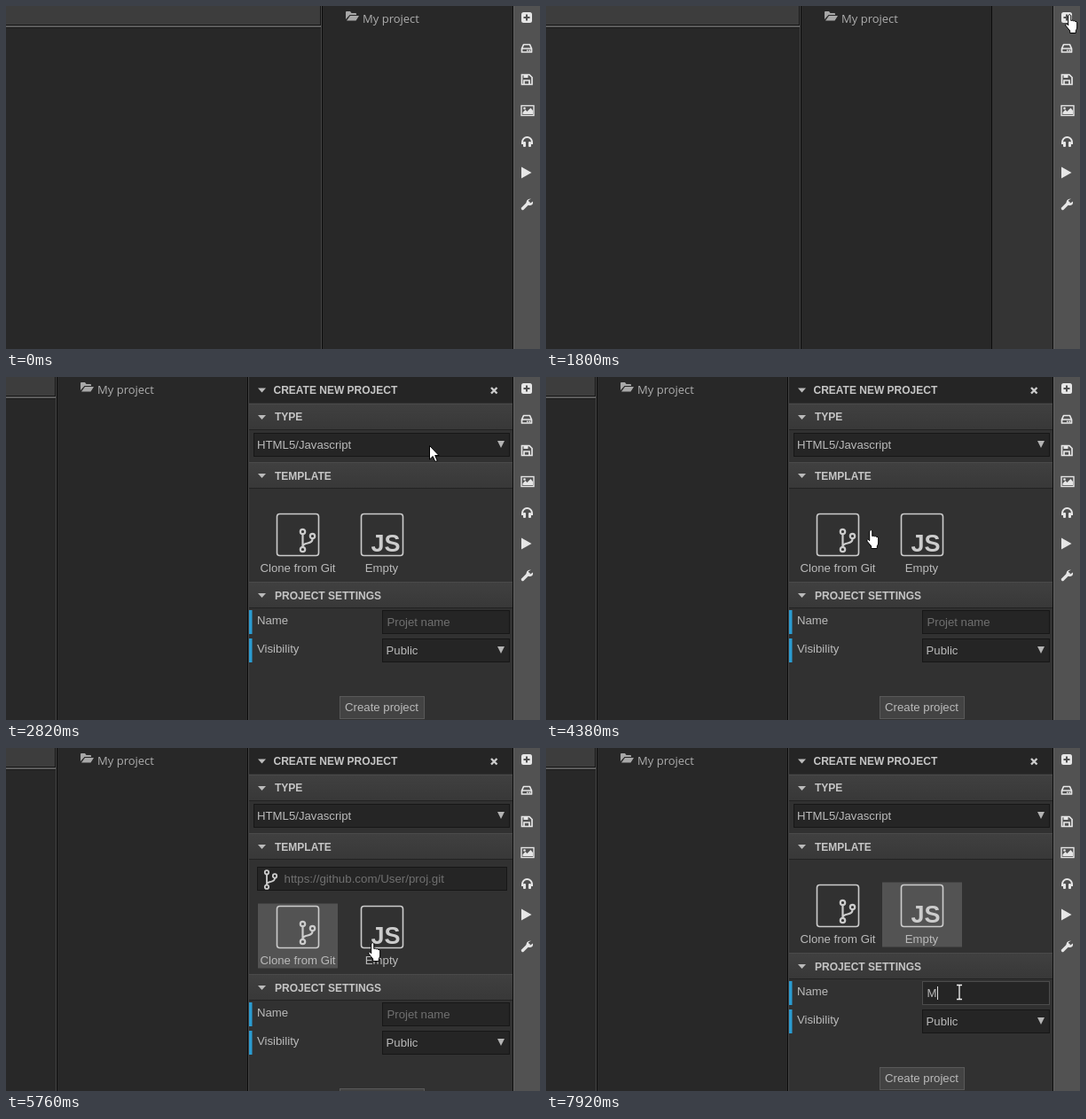
Animation, 602 px wide and 387 px high, one loop 8 s. Source, as an HTML page:

```html
<!DOCTYPE html>
<html lang="en">
<head>
<meta charset="utf-8">
<title>Create new project</title>
<style>
  html, body { margin: 0; width: 100%; height: 100%; overflow: hidden; background: #282828; }
  svg { display: block; }
  text { font: 13.2px "Liberation Sans", Arial, sans-serif; fill: #bababa; white-space: pre; }
  .tree { font: 13px "Open Sans", sans-serif; fill: #adadad; }
  .title { font-weight: bold; font-size: 12px; fill: #c6c6c6; }
  .js { font-weight: bold; font-size: 27px; fill: #ccc; }
  .hint { fill: #707070; }
  .mid { text-anchor: middle; }
  .field { fill: #252525; stroke: #171717; }
  .tile { fill: none; stroke: #ccc; stroke-width: 1.6; }
  .line { fill: none; stroke: #e6e6e6; stroke-width: 1.7; }
  .cursor { fill: #fff; stroke: #000; stroke-width: 1; }
</style>
</head>
<body>
<svg width="602" height="387" viewBox="0 0 602 387">
  <defs>
    <linearGradient id="bar" x2="0" y2="1">
      <stop stop-color="#404040"/><stop offset="1" stop-color="#383838"/>
    </linearGradient>
    <path id="fold" d="M284 0h9l-4.5 5z" fill="#bbb"/>
    <path id="drop" d="M554 0h8l-4 8z" fill="#b4b4b4"/>
    <g id="section">
      <path d="M274 0h297v30H274z" fill="url(#bar)"/>
      <path d="M274 .5h297" stroke="#4a4a4a"/>
      <path d="M274 29.5h297" stroke="#222"/>
      <use href="#fold" y="13"/>
    </g>
    <g id="branch" fill="none" stroke="#ccc" stroke-width="2.2">
      <circle cx="-5.5" cy="-10" r="2.7"/>
      <circle cx="-5.5" cy="10" r="2.7"/>
      <circle cx="5.5" cy="-5" r="2.7"/>
      <path d="M-5.500-7V7M5.500-2Q5.500 2 0 3T-5.500 7"/>
    </g>
    <clipPath id="inputClip"><rect id="clipBox" x="283" width="282"/></clipPath>
  </defs>

  <rect width="602" height="387" fill="#343434"/>

  <!-- editor and project tree, pushed left by the panel -->
  <g id="workspace">
    <path d="M0 0h571v387H0z" fill="#282828"/>
    <path d="M0 0h354v21H0z" fill="#3d3d3d"/>
    <path d="M0 21.500H355M354.500 0v21" stroke="#151515"/>
    <path d="M0 23h355" stroke="#5c5c5c" stroke-width="2"/>
    <path d="M0 24.500h355" stroke="#1c1c1c"/>
    <path d="M355.500 0v387" stroke="#464646"/>
    <path d="M356.500 0v387M571.500 0v387" stroke="#0c0c0c"/>
    <path d="M383 15V7q0-1 1-1h4l1.500 2H394q1 0 1 1v1h-7.500zM384 16.500l4-5.500h10l-3.500 5.500z" fill="#a8a8a8"/>
    <text class="tree" x="402" y="19">My project</text>
  </g>

  <g id="panel">
    <path d="M273 0h298v387H273z" fill="#313131"/>
    <path d="M274 0h297v29H274z" fill="#252525"/>
    <path d="M273.500 0v387" stroke="#444"/>
    <use href="#fold" y="12.500"/>
    <text class="title" x="301.500" y="19">CREATE NEW PROJECT</text>
    <path d="M547 12l6.500 6.500m0-6.500L547 18.500" stroke="#ccc" stroke-width="2.4"/>
    <use href="#section" y="30"/>
    <text class="title" x="303" y="49">TYPE</text>
    <rect class="field" x="279.500" y="63.500" width="288" height="26"/>
    <text x="283" y="81">HTML5/Javascript</text>
    <use href="#drop" y="72"/>
    <use href="#section" y="96"/>
    <text class="title" x="303" y="116">TEMPLATE</text>

    <g id="lower">
      <rect id="picked" y="151.500" width="90" height="73" fill="#535353"/>
      <rect class="tile" x="305.500" y="154.500" width="47" height="47" rx="3"/>
      <use href="#branch" x="340" y="184.500"/>
      <text class="mid" x="329" y="220">Clone from Git</text>
      <rect class="tile" x="400.500" y="154.500" width="47" height="47" rx="3"/>
      <text class="js" x="411.500" y="197">JS</text>
      <text class="mid" x="423.500" y="220">Empty</text>

      <use href="#section" y="231"/>
      <text class="title" x="303" y="251">PROJECT SETTINGS</text>
      <path d="M274 263h3.500v27H274zM274 295h3.500v27H274z" fill="#2b9bd0"/>
      <text x="283" y="279">Name</text>
      <text x="283" y="311">Visibility</text>
      <rect id="nameBox" class="field" x="424.500" y="263.500" width="143" height="26"/>
      <text id="name" x="429.500" y="281"></text>
      <path id="caret" d="M.5 269v15" stroke="#ddd"/>
      <rect class="field" x="424.500" y="295.500" width="143" height="26"/>
      <text x="428.500" y="313">Public</text>
      <use href="#drop" y="304"/>
      <rect x="376.500" y="360.500" width="95" height="25" fill="#434343" stroke="#595959"/>
      <text class="mid" x="423.500" y="377">Create project</text>
    </g>

    <g id="repo">
      <rect id="repoBox" class="field" x="283.500" width="281"/>
      <g clip-path="url(#inputClip)">
        <text id="url" class="hint" x="313.500" style="font-size:13.3px">https://github.com/User/proj.git</text>
      </g>
      <use id="repoIcon" href="#branch"/>
    </g>
  </g>

  <!-- toolbar -->
  <path d="M572 0h30v387h-30z" fill="#525252"/>
  <path d="M571.500 0v387" stroke="#0c0c0c"/>
  <path d="M572.500 0v387" stroke="#626262"/>
  <g fill="#e6e6e6">
    <rect x="581" y="7" width="12" height="12" rx="2.500"/>
    <path d="M583.500 13h7M587 9.500v7" stroke="#525252" stroke-width="2"/>
    <path class="line" d="M581.500 48l2-4.500h7l2 4.500v4h-11zh11" stroke-linejoin="round"/>
    <path d="M587 49.500h1.500v1.500H587zM589.500 49.500h1.500v1.500h-1.500z"/>
    <path class="line" d="M581.500 77.500h8.500l3 3v8h-11.500zM584 88v-4h6v4"/>
    <path d="M583.500 77h5v4h-5z"/>
    <rect class="line" x="581" y="112.500" width="14" height="11" style="stroke-width:1.400"/>
    <path d="M582.500 122v-2l3-3 2 2 4-4 2.500 3v4z"/>
    <circle cx="584.500" cy="115.500" r="1.300"/>
    <path class="line" d="M582 156v-2.500a5.300 5.300 0 0 1 11 0v2.500" style="stroke-width:2"/>
    <rect x="583" y="153" width="3" height="6" rx="1"/>
    <rect x="589" y="153" width="3" height="6" rx="1"/>
    <path d="M581 181.500v13l11.500-6.500z"/>
    <path d="M582.500 228.500l6.500-6.500" stroke="#e6e6e6" stroke-width="3.400" stroke-linecap="round"/>
    <path d="M592 217.500l-3 1.800v2l2 1.200 3-2q.5 4-3 4.500-4 .3-4.500-3.500.5-4 5.500-4z"/>
  </g>

  <g id="pointer">
    <path id="arrow" class="cursor" d="M.5.500V16l3.700-3.500 2.600 6 2.500-1-2.600-6H11z"/>
    <path id="hand" class="cursor" d="M-1.300 1.800Q.3-.8 1.800 1.800V7.500q1.500-1 2.600.3 1.500-.6 2.300.6 1.800-.3 2 1.500V15q0 2-1.400 3.800V21.500H.7V19L-3.800 13.500q-1-2 .5-2.400 1 0 2 1.700z"/>
    <path id="beam" d="M-3 .5h2.500L0 1.500.5.500H3M0 1.500v14M-3 16.500h2.500l.5-1 .5 1H3" fill="none" stroke="#f2f2f2" stroke-width="1.300"/>
  </g>
</svg>

<script>
const LOOP = 8000, STEP = 60;
const PANEL_WIDTH = 299, INPUT_SPACE = 24;

// Pointer moves: start, end, target x, target y
const startAt = [354.5, 184];
const moves = [
  [180, 960, 584, 32],
  [960, 1380, 590, 9],
  [2160, 3060, 455, 90],
  [3960, 4673, 316, 219],
  [5460, 5800, 416, 219],
  [6240, 6600, 428, 219],
  [6600, 6960, 466, 267],
];
// Pointer shape from each time on
const shapes = [[180, "arrow"], [1200, "hand"], [2280, "arrow"], [4260, "hand"], [6720, "arrow"], [6840, "beam"]];

const $ = id => document.getElementById(id);
const set = (id, attrs) => Object.entries(attrs).forEach(([k, v]) => $(id).setAttribute(k, v));
const show = (id, on) => set(id, { visibility: on ? "inherit" : "hidden" });
const shift = (id, x, y) => set(id, { transform: `translate(${x} ${y})` });

function swing(t, start, end) {
  const p = Math.min(1, Math.max(0, (t - start) / (end - start)));
  return 0.5 - Math.cos(p * Math.PI) / 2;
}

function drawPointer(t) {
  let [x, y] = startAt;
  for (const [start, end, toX, toY] of moves) {
    const p = swing(t, start, end);
    x += (toX - x) * p;
    y += (toY - y) * p;
  }
  shift("pointer", Math.round(x), Math.round(y));
  const current = shapes.filter(([from]) => t >= from).pop();
  for (const name of ["arrow", "hand", "beam"]) show(name, current && current[1] === name);
}

function drawTemplates(t) {
  const open = swing(t, 4820, 5250) - swing(t, 6210, 6620);
  const top = 140 - 6 * open;
  shift("lower", 0, Math.round(INPUT_SPACE * open));
  show("repo", open > 0);
  set("repoBox", { y: top + 0.5, height: 26 * open });
  set("clipBox", { y: top, height: 27 * open });
  set("url", { y: top + 18 });
  set("repoIcon", { transform: `translate(298.5 ${top + 14.5}) scale(.82)` });
  show("picked", t >= 4800);
  set("picked", { x: t < 6240 ? 284 : 379 });
}

function drawName(t) {
  const typed = t >= 7920;
  $("name").textContent = typed ? "M" : "Projet name";
  $("name").setAttribute("class", typed ? "" : "hint");
  $("nameBox").style.stroke = t >= 7080 ? "#4c4c4c" : "";
  show("caret", typed || (t >= 7080 && t < 7560));
  shift("caret", typed ? 441 : 430, 0);
}

function frame(now) {
  const t = Math.floor((now % LOOP) / STEP) * STEP;
  const opened = t >= 2040;
  shift("workspace", -Math.round(PANEL_WIDTH * (opened ? 1 : swing(t, 1676, 2064))), 0);
  show("panel", opened);
  if (opened) drawTemplates(t);
  else for (const id of ["repo", "picked"]) show(id, false);
  drawName(t);
  drawPointer(t);
  requestAnimationFrame(frame);
}
requestAnimationFrame(frame);
</script>
</body>
</html>
```
